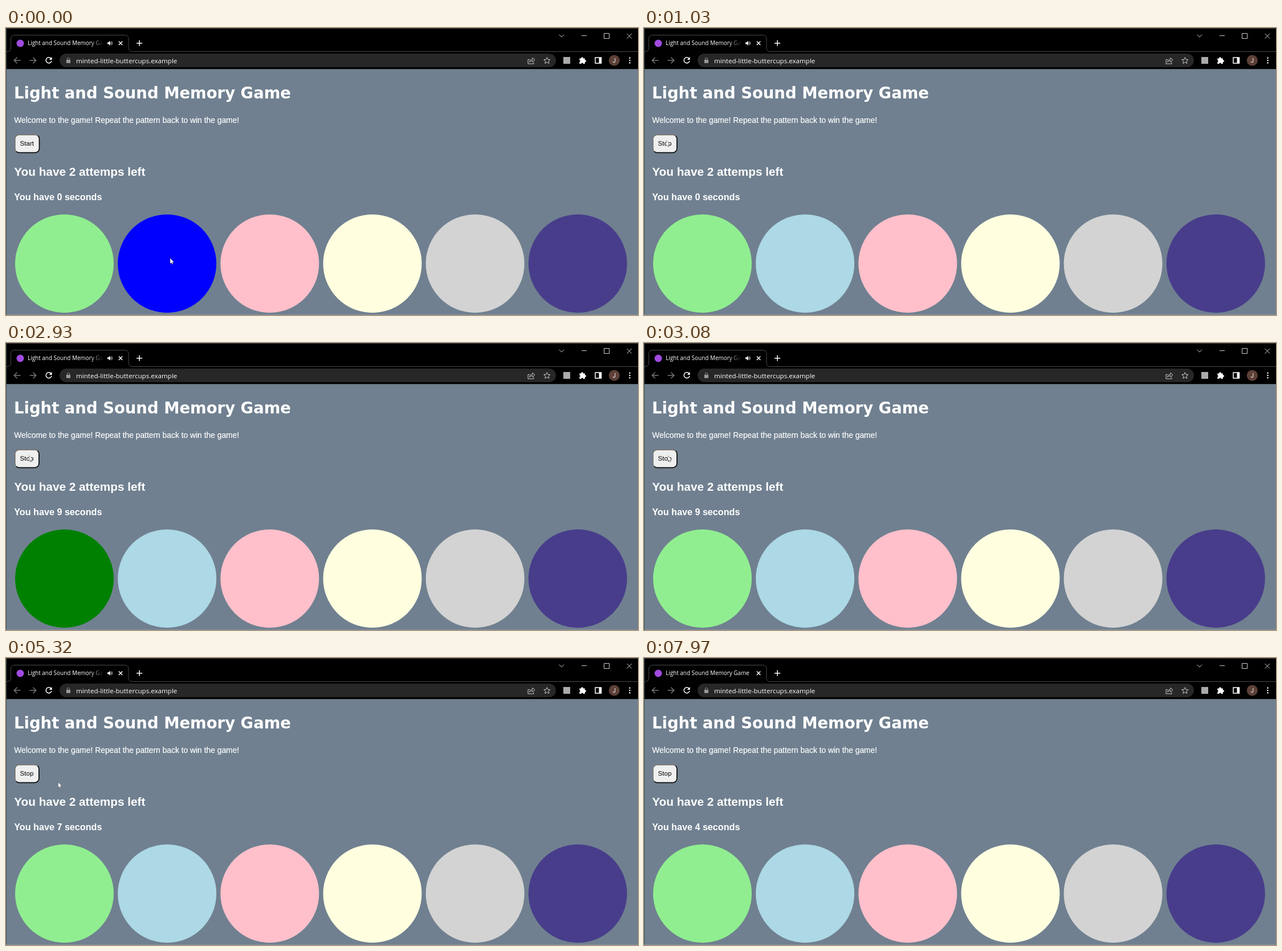
An HTML page that plays this animation: 1109x505 px, repeating every 8000 ms.

```html
<!DOCTYPE html>
<html lang="en">
<head>
<meta charset="utf-8">
<title>Memory game</title>
<style>
html, body { margin: 0; height: 100%; overflow: hidden; background: #708090; }
svg { display: block; width: 100vw; height: 100vh; }
.ui { font-family: "Open Sans", "Noto Sans", sans-serif; fill: #fff; }
.page { font-family: "Liberation Sans", Arial, sans-serif; fill: #fff; }
.bold { font-weight: 700; }
.line { fill: none; stroke: #fff; stroke-width: 1.5; }
.thin { fill: none; stroke: #ccc; stroke-width: 1; }
</style>
</head>
<body>
<svg viewBox="0 0 1109 505" preserveAspectRatio="none">
  <defs>
    <linearGradient id="bevel" x1="0" y1="0" x2="1" y2="1">
      <stop offset=".5" stop-color="#777270"/>
      <stop offset=".5" stop-color="#080808"/>
    </linearGradient>
    <linearGradient id="fade" gradientUnits="userSpaceOnUse" x1="149" x2="171" y1="0" y2="0">
      <stop stop-color="#fff"/>
      <stop offset="1" stop-color="#000"/>
    </linearGradient>
    <mask id="cut" maskUnits="userSpaceOnUse" x="30" y="15" width="142" height="24">
      <rect x="30" y="15" width="142" height="24" fill="url(#fade)"/>
    </mask>
  </defs>

  <rect width="1109" height="505" fill="#708090"/>
  <rect width="1109" height="73" fill="#000"/>
  <path d="M0 .5H1109" stroke="#4c4c4c"/>
  <path d="M0 72.5H1109" stroke="#5c5f63"/>
  <path d="M.5 0V505" stroke="#34545a"/>
  <path d="M0 504.5H1109" stroke="#84919e"/>

  <!-- tab strip -->
  <path d="M0 41.5H2Q8.5 41 8.5 35V19Q8.5 12.5 15 12.5H208.5Q215 12.5 215 19V35Q215 41 221 41.5H1109" fill="none" stroke="#4a4a4a"/>
  <circle cx="25" cy="27" r="6.5" fill="#a04be0"/>
  <text id="tab" class="ui" x="38" y="30.3" font-size="9.95">Light and Sound Memory Game</text>
  <g id="sound">
    <path d="M178 25.2H180L183 22.7V30.8L180 28.3H178Z" fill="#fff"/>
    <path class="thin" d="M184.3 25Q185.3 26.7 184.3 28.5M185.3 23.3Q188 26.7 185.3 30.2"/>
  </g>
  <path class="line" d="M197.8 23.5L204.3 30M204.3 23.5L197.8 30M229 26.7H239.2M234.1 21.6V31.8"/>
  <path class="thin" d="M970.5 11.7L974.8 16L979.1 11.7M1010 13.5H1019M1049.5 9.5H1058.5V18.5H1049.5ZM1089.5 10L1098 18.5M1098 10L1089.5 18.5"/>

  <!-- toolbar -->
  <path class="line" style="stroke:#777" d="M25.5 57H14.5M19.5 51.8L14.3 57L19.5 62.2M41.5 57H52.5M47.5 51.8L52.7 57L47.5 62.2"/>
  <path class="line" d="M79.3 54A5 5 0 1 0 80 57.8"/>
  <path d="M80.6 51V56H75.6Z" fill="#fff"/>
  <rect x="94" y="45" width="871" height="24" rx="12" fill="#272727"/>
  <rect x="105.8" y="56" width="7.2" height="5.8" rx=".8" fill="#999"/>
  <path class="thin" style="stroke:#999" d="M107.4 56V54.5A2 2 0 0 1 111.4 54.5V56"/>
  <text class="ui" x="123" y="61.6" font-size="11.6">minted-little-buttercups.example</text>
  <path class="thin" d="M919 55.5H916V63H926V60.5M918.5 60Q919.5 55 924 55V52.5L928 56.2L924 60V57.5Q920.5 57.3 918.5 60Z"/>
  <path class="thin" d="M949.3 51.7L950.9 55.4L954.9 55.7L951.9 58.3L952.8 62.3L949.3 60.2L945.8 62.3L946.7 58.3L943.7 55.7L947.7 55.4Z"/>
  <rect x="978" y="51" width="12" height="12" fill="#aaa"/>
  <path d="M1006.3 53.5H1009.5A1.7 1.7 0 1 1 1012.7 53.5H1015.8V56.5A1.7 1.7 0 1 1 1015.8 59.7V62.9H1012.8A1.7 1.7 0 0 0 1009.4 62.9H1006.3V59.8A1.7 1.7 0 0 0 1006.3 56.5Z" fill="#fff"/>
  <path class="line" d="M1034 52H1044.5V62H1034Z"/>
  <path d="M1040.5 52H1045V62H1040.5Z" fill="#fff"/>
  <circle cx="1067.3" cy="57" r="9.6" fill="#5d4037"/>
  <text x="1067.3" y="60.7" fill="#fff" font-size="10" text-anchor="middle" font-family="Roboto, sans-serif">J</text>
  <path d="M1094.5 52.8V62" fill="none" stroke="#fff" stroke-width="2.6" stroke-linecap="round" stroke-dasharray="0 4.2"/>

  <!-- page -->
  <text x="14" y="123.6" class="bold" fill="#fff" font-size="27.47" font-family="DejaVu Sans, Verdana, sans-serif">Light and Sound Memory Game</text>
  <text class="page" x="14.3" y="166.6" font-size="13.83" stroke="#fff" stroke-width=".2">Welcome to the game! Repeat the pattern back to win the game!</text>
  <rect id="button" x="15.8" y="187.8" width="42.7" height="31.5" rx="7.4" fill="#efefef" stroke="url(#bevel)" stroke-width="1.7"/>
  <text id="label" class="page" style="fill:#000" x="24.6" y="207" font-size="11.52"></text>
  <text class="page bold" x="14.3" y="260.2" font-size="20.74">You have 2 attemps left</text>
  <text id="clock" class="page bold" x="14.3" y="303" font-size="16.17"></text>
  <g id="lights"></g>

  <path id="arrow" d="M0 0V9.8L2.2 7.8L3.7 11L5.2 10.3L3.8 7.2H6.9Z" fill="#fff" stroke="#111" stroke-opacity=".65" stroke-width=".6"/>
  <path id="beam" d="M-2 -5.5H2M0 -5.5V5.5M-2 5.5H2" fill="none" stroke="#3c444c" stroke-width=".8" opacity=".75"/>
</svg>
<script>
const LOOP = 8000;
const STEP = LOOP / 60; // the screen refreshes in even steps
const LAG = 30;
const $ = id => document.getElementById(id);

const lights = ["#90ee90", "#add8e6", "#ffc0cb", "#ffffe0", "#d3d3d3", "#483d8b"].map((fill, i) => {
  const c = document.createElementNS("http://www.w3.org/2000/svg", "circle");
  Object.entries({ cx: 102.5 + i * 180.16, cy: 414.5, r: 86.5, fill })
    .forEach(([k, v]) => c.setAttribute(k, v));
  $("lights").append(c);
  return c;
});

// turning points of the pointer: time, x, y
const path = [
  [0, 288, 405], [660, 39, 198], [2800, 39, 198], [3880, 51, 200], [5200, 52, 200],
  [5320, 91, 217], [5840, 104, 270], [6260, 54, 301], [6500, 82, 317],
  [6800, 115, 315], [7190, 119, 281], [7730, 76, 297], [LOOP, 82, 302]
];

const clamp = v => Math.min(1, Math.max(0, v));
const mix = (a, b, k) => a + (b - a) * k;

function pointerAt(t) {
  const i = Math.max(1, path.findIndex(p => p[0] >= t));
  const [t0, x0, y0] = path[i - 1], [t1, x1, y1] = path[i];
  const k = (t - t0) / (t1 - t0);
  return [mix(x0, x1, k), mix(y0, y1, k)];
}

const overText = (x, y) => (x < 245 && y > 242 && y < 265) || (x < 168 && y > 288 && y < 307);

function secondsAt(t) {
  if (t < 1000) return 0;
  return t < 1900 ? "NaN" : 10 - Math.floor((t - 1900) / 1000);
}

function draw(time) {
  const t = Math.floor((time + LAG) / STEP) * STEP;

  const [x, y] = pointerAt(t);
  const text = overText(x, y);
  for (const [id, on] of [["arrow", !text], ["beam", text]]) {
    $(id).setAttribute("transform", `translate(${x} ${y})`);
    $(id).style.display = on ? "" : "none";
  }

  const started = time >= 910;
  $("label").textContent = started ? "Stop" : "Start";
  $("button").setAttribute("width", started ? 42 : 42.7);
  $("clock").textContent = `You have ${secondsAt(t)} seconds`;

  lights[0].style.fill = time >= 1990 && time < 3080 ? "#008000" : "";
  lights[1].style.fill = time < 270 ? "#0000ff" : "";

  const level = clamp((6500 - t) / 750);
  $("sound").style.opacity = level;
  if (level) $("tab").setAttribute("mask", "url(#cut)");
  else $("tab").removeAttribute("mask");
}

const start = performance.now();
function tick() {
  draw((performance.now() - start) % LOOP);
  requestAnimationFrame(tick);
}
tick();
</script>
</body>
</html>
```
